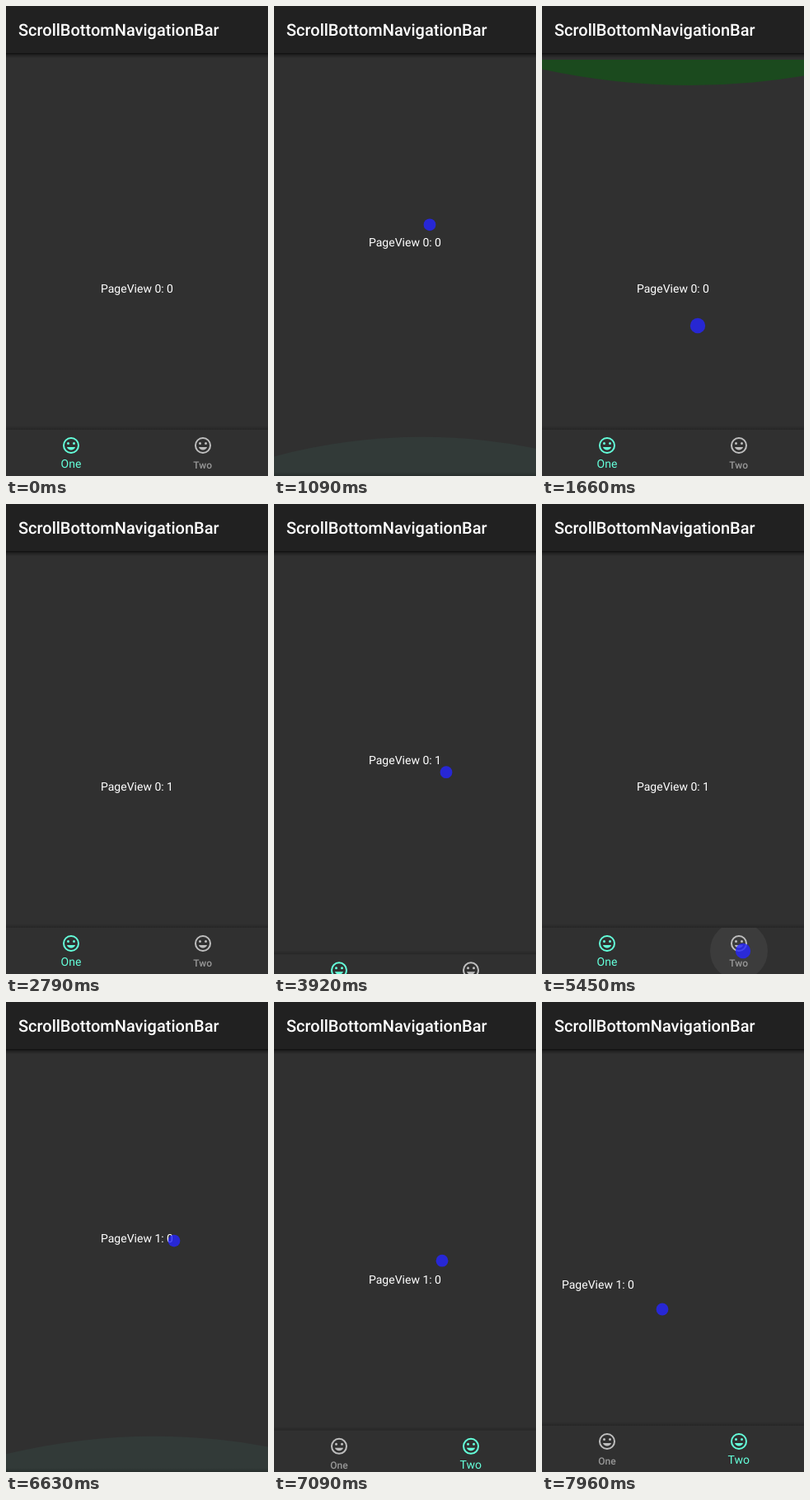
Recreate the animation shown at these times as an HTML page. Size 318x569 px, loop 8 s.

```html
<!DOCTYPE html>
<html lang="en">
<head>
<meta charset="utf-8">
<title>Scroll bottom navigation bar</title>
<style>
  html, body { margin: 0; width: 100%; height: 100%; overflow: hidden; background: #303030; }
  svg { display: block; width: 100vw; height: 100vh; font-family: Roboto, sans-serif; }
  text { text-rendering: geometricPrecision; }
</style>
</head>
<body>
<svg viewBox="0 0 318 569">
  <defs>
    <linearGradient id="drop" x1="0" y1="0" x2="0" y2="1">
      <stop offset="0" stop-color="#000" stop-opacity=".72"/>
      <stop offset=".4" stop-color="#000" stop-opacity=".3"/>
      <stop offset="1" stop-color="#000" stop-opacity="0"/>
    </linearGradient>
    <linearGradient id="lift" x1="0" y1="1" x2="0" y2="0">
      <stop offset="0" stop-color="#000" stop-opacity=".2"/>
      <stop offset="1" stop-color="#000" stop-opacity="0"/>
    </linearGradient>
    <clipPath id="body"><rect y="65" width="318" height="504"/></clipPath>
    <clipPath id="bar"><rect y="513" width="318" height="56"/></clipPath>
    <g id="face">
      <circle r="9" fill="none" stroke="currentColor" stroke-width="2"/>
      <g fill="currentColor">
        <circle cx="-3.5" cy="-2.5" r="1.5"/>
        <circle cx="3.5" cy="-2.5" r="1.5"/>
        <path d="M0 5.5C2.33 5.5 4.31 4.04 5.11 2H-5.11C-4.31 4.04 -2.33 5.5 0 5.5Z"/>
      </g>
    </g>
  </defs>

  <rect width="318" height="569" fill="#303030"/>
  <g font-size="14" fill="#fff" text-anchor="middle">
    <text id="page" x="159" y="347"></text>
    <text id="next" x="159" y="347"></text>
  </g>
  <g clip-path="url(#body)">
    <path id="topGlow" fill="#1b4a1e"/>
    <path id="lowGlow" fill="#323a38"/>
  </g>

  <g id="nav">
    <rect y="508" width="318" height="5" fill="url(#lift)"/>
    <rect y="513" width="318" height="56" fill="#303030"/>
    <g clip-path="url(#bar)"><circle id="ripple" cx="239" cy="541" fill="#fff"/></g>
    <g id="one"><use href="#face" x="79" y="532"/><text x="79" text-anchor="middle">One</text></g>
    <g id="two"><use href="#face" x="239" y="532"/><text x="238.7" text-anchor="middle">Two</text></g>
  </g>

  <rect y="57" width="318" height="6" fill="url(#drop)"/>
  <rect width="318" height="57" fill="#212121"/>
  <text x="15" y="36" font-size="20" font-weight="500" fill="#fff">ScrollBottomNavigationBar</text>
  <circle id="dot" fill="#2525ff"/>
</svg>

<script>
const LOOP = 8000, WIDTH = 318, BAR = 56, SLOP = 18, FADE = 150;
const $ = id => document.getElementById(id);
const set = (el, attrs) => { for (const k in attrs) el.setAttribute(k, attrs[k]); };
const ramp = (t, from, to) => Math.max(0, Math.min(1, (t - from) / (to - from)));
const easeOut = p => 1 - (1 - p) ** 2;
const smooth = p => p * p * (3 - 2 * p);
const mix = (a, b, p) => a + (b - a) * p;

// Vertical drags go up from y to top at time turn, then down to low at time end.
const drags = [
  { x: 189, start: 610, turn: 1230, end: 1620, y: 375, top: 259, low: 387 },
  { x: 209, start: 3260, turn: 3800, end: 4070, y: 385, top: 301, low: 357, release: 4540 },
  { x: 204, start: 6280, turn: 6935, end: 7350, y: 384, top: 263, low: 421 }
];
const swipes = [
  { start: 2290, end: 2450, from: 270, to: 110, y: 348 },
  { start: 7810, end: 7960, from: 267, to: 146, y: 372, release: LOOP }
];
const tap = { start: 5450, end: 5450 };

const dragY = (d, t) => t < d.turn
  ? mix(d.y, d.top, easeOut(ramp(t, d.start, d.turn)))
  : mix(d.top, d.low, smooth(ramp(t, d.turn, d.end)));

const touches = [
  ...drags.map(d => ({ ...d, pos: t => [d.x, dragY(d, t)] })),
  ...swipes.map(s => ({ ...s, pos: t => [mix(s.from, s.to, ramp(t, s.start, s.end)), s.y] })),
  { ...tap, pos: () => [244, 541] }
];

// The bar follows the finger; travel beyond its height stretches a glow.
function scroll(t) {
  const d = drags.find(d => t >= d.start && t < d.end + 500);
  if (!d) return { lift: 0, topPull: 0, lowPull: 0 };
  const y = dragY(d, t), up = t < d.turn;
  const moved = up ? d.y - SLOP - y : BAR - (y - d.top);
  const stretch = px => 48 * (1 - Math.exp(-Math.max(0, px) / 9));
  return {
    lift: BAR * ramp(moved, 0, BAR),
    topPull: up ? 0 : stretch(-moved - 1) * (1 - ramp(t, d.end, d.end + 220)),
    lowPull: stretch(d.y - SLOP - BAR - (up ? y : d.top)) * (1 - ramp(t, d.turn, d.turn + 100))
  };
}

// Shallow parabola of height h growing from an edge, peaking at x = 180.
function glow(el, edge, dir, h) {
  const y = k => edge + dir * h * k;
  set(el, {
    d: `M0 ${edge}V${y(.5)}Q159 ${y(1.383)} ${WIDTH} ${y(.706)}V${edge}Z`,
    opacity: ramp(h, 0, 25)
  });
}

function drawDot(t) {
  const until = touch => touch.release || touch.end;
  const touch = touches.find(c => t >= c.start && t < until(c) + FADE);
  if (!touch) return set($("dot"), { opacity: 0 });
  const [cx, cy] = touch.pos(t), out = ramp(t, until(touch), until(touch) + FADE);
  set($("dot"), { cx, cy, r: t < until(touch) ? 7.4 : 9.2, opacity: .8 * (1 - out ** 3) });
}

function drawTab(group, p) {
  const tint = grey => `rgb(${mix(grey, 100, p)},${mix(grey, 255, p)},${mix(grey, 218, p)})`;
  group.style.color = tint(190);
  set(group.querySelector("text"), {
    y: mix(559.6, 559, p),
    "font-size": mix(12, 14, p),
    "font-weight": p < .5 ? 500 : 400,
    fill: tint(152)
  });
}

function draw(t) {
  const tab = t < 5540 ? 0 : 1;
  const { lift, topPull, lowPull } = scroll(t);
  const dx = tab ? -91 * ramp(t, 7810, 7960) : -WIDTH * smooth(ramp(t, 2290, 2790));
  [$("page"), $("next")].forEach((el, i) => {
    el.textContent = `PageView ${tab}: ${i}`;
    set(el, { transform: `translate(${dx + i * WIDTH} ${-lift})` });
  });
  set($("nav"), { transform: `translate(0 ${lift})` });

  const chosen = tab * easeOut(ramp(t, 5500, 5700)), spread = ramp(t, 5540, 5700);
  drawTab($("one"), 1 - chosen);
  drawTab($("two"), chosen);
  set($("ripple"), { r: mix(35, 40, spread), opacity: t < tap.start ? 0 : .06 * (1 - spread) });

  glow($("topGlow"), 57, 1, topPull);
  glow($("lowGlow"), 569, -1, lowPull);
  drawDot(t);
}

const begin = performance.now();
function tick() {
  draw((performance.now() - begin) % LOOP);
  requestAnimationFrame(tick);
}
tick();
</script>
</body>
</html>
```
